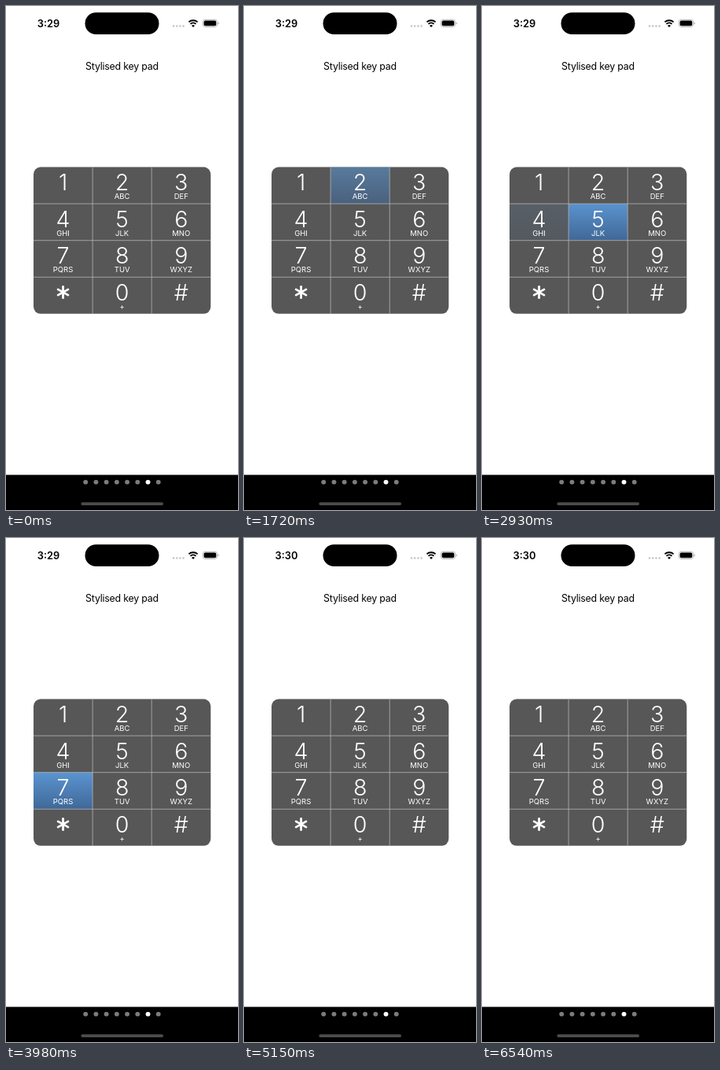
Animation of 295x640 px, one loop 8.06 s. Source, as an HTML page:

```html
<!DOCTYPE html>
<html lang="en">
<head>
<meta charset="utf-8">
<title>Stylised key pad</title>
<style>
  html, body { margin: 0; width: 100%; height: 100%; overflow: hidden; background: #fff; }
  svg { display: block; width: 100vw; height: 100vh; }
  text { font-family: Inter, "Liberation Sans", sans-serif; text-anchor: middle; }
  .clock { font-size: 12.8px; font-weight: 600; }
  .title { font-size: 12.4px; letter-spacing: -.22px; }
  .digit { font-size: 28.6px; font-weight: 300; fill: #fff; }
  .letters { font-size: 9.5px; fill: #fff; }
  .star { stroke: #fff; stroke-width: 2.8; stroke-linecap: round; }
  .rule { stroke: #b4b4b4; stroke-width: .8; }
</style>
</head>
<body>
<svg viewBox="0 0 295 640">
  <defs>
    <linearGradient id="blue" x1="0" y1="0" x2="0" y2="1">
      <stop offset="0" stop-color="#5a94d0"/>
      <stop offset="1" stop-color="#406898"/>
    </linearGradient>
    <clipPath id="round"><rect x="35" y="204.6" width="225.3" height="186.2" rx="9"/></clipPath>
  </defs>

  <text id="clock" class="clock" x="54" y="26.6">3:29</text>
  <rect x="100.5" y="8.3" width="94" height="27.8" rx="13.9"/>
  <g id="signal" fill="#c3c3c3"></g>
  <g fill="none" stroke="#000" stroke-width="1.9">
    <path d="M232.4 20.4a8.2 8.2 0 0 1 11.2 0"/>
    <path d="M234.5 22.9a5.1 5.1 0 0 1 7 0"/>
  </g>
  <path d="M238 27l-2-2.1a2.9 2.9 0 0 1 4 0z"/>
  <rect x="250.3" y="17.3" width="18.3" height="9.2" rx="3" fill="none" stroke="#a6a6a6" stroke-width=".8"/>
  <rect x="251.6" y="18.6" width="15.7" height="6.6" rx="1.8"/>
  <path d="M269.6 20.3q1.3.5 1.3 1.6t-1.3 1.6z" fill="#a6a6a6"/>

  <text class="title" x="147.5" y="80.6">Stylised key pad</text>

  <g clip-path="url(#round)">
    <rect x="35" y="204" width="226" height="188" fill="#575757"/>
    <g id="keys"></g>
    <g id="rules"></g>
  </g>

  <rect y="595.4" width="295" height="45"/>
  <g id="dots"></g>
  <rect x="95.3" y="630.2" width="104.8" height="3.8" rx="1.9" fill="#4c4c4c"/>
</svg>
<script>
const LOOP = 8060, FADE = 500, NEW_MINUTE = 5050;
const LEFT = 35, TOP = 204.5, W = 75.1, H = 46.6;

// label, letters, press time
const KEYS = [
  ['1', '', 970], ['2', 'ABC', 1510], ['3', 'DEF', 2040],
  ['4', 'GHI', 2480], ['5', 'JLK', 2910], ['6', 'MNO', 3290],
  ['7', 'PQRS', 3980], ['8', 'TUV', 4310], ['9', 'WXYZ', 4645],
  ['*', '', 5290], ['0', '+', 5620], ['#', '', 5985]
];

// the picture updates in even steps: first, last, count
const RUNS = [
  [970, 1720, 8], [1830, 2580, 8], [2700, 3460, 8], [3570, 3790, 3],
  [3980, 4750, 8], [4850, 5150, 4], [5290, 5990, 8], [6100, 6540, 5]
];
const TICKS = [0, ...RUNS.flatMap(([a, b, n]) =>
  Array.from({ length: n }, (_, i) => a + (b - a) * i / (n - 1)))];

const $ = id => document.getElementById(id);

function add(parent, tag, attrs, text) {
  const el = document.createElementNS('http://www.w3.org/2000/svg', tag);
  for (const k in attrs) el.setAttribute(k, attrs[k]);
  if (text) el.textContent = text;
  parent.appendChild(el);
  return el;
}

function star(cx, cy) {
  for (const deg of [30, 90, 150]) {
    const a = deg * Math.PI / 180, dx = 7.4 * Math.cos(a), dy = 7.2 * Math.sin(a);
    add($('keys'), 'line', { class: 'star', x1: cx - dx, y1: cy - dy, x2: cx + dx, y2: cy + dy });
  }
}

const glows = KEYS.map(([label, letters], i) => {
  const x = LEFT + i % 3 * W, y = TOP + Math.floor(i / 3) * H, cx = x + W / 2;
  const glow = add($('keys'), 'rect', { x, y, width: W, height: H, fill: 'url(#blue)', opacity: 0 });
  if (label === '*') star(cx, y + 19.2);
  else add($('keys'), 'text', { class: 'digit', x: cx, y: y + 29.6 }, label);
  if (letters) add($('keys'), 'text', { class: 'letters', x: cx, y: y + 40.7 }, letters);
  return glow;
});

for (let i = 1; i < 3; i++) {
  const x = LEFT + i * W;
  add($('rules'), 'line', { class: 'rule', x1: x, x2: x, y1: TOP, y2: TOP + 4 * H });
}
for (let i = 1; i < 4; i++) {
  const y = TOP + i * H;
  add($('rules'), 'line', { class: 'rule', x1: LEFT, x2: LEFT + 3 * W + 1, y1: y, y2: y });
}
for (let i = 0; i < 4; i++) add($('signal'), 'circle', { cx: 213 + i * 4.2, cy: 25.4, r: 1.25 });
for (let i = 0; i < 8; i++) {
  add($('dots'), 'circle', { cx: 101.2 + i * 13.22, cy: 604.6, r: 2.95, fill: i === 6 ? '#fff' : '#7c7c7c' });
}

function draw(now) {
  const t = now % LOOP;
  const shown = TICKS.findLast(k => k <= t);
  KEYS.forEach(([, , press], i) => {
    const age = shown - press;
    glows[i].setAttribute('opacity', age < 0 ? 0 : Math.max(0, 1 - age / FADE));
  });
  $('clock').textContent = shown < NEW_MINUTE ? '3:29' : '3:30';
}

const start = performance.now();
function frame() {
  draw(performance.now() - start);
  requestAnimationFrame(frame);
}
frame();
</script>
</body>
</html>
```
